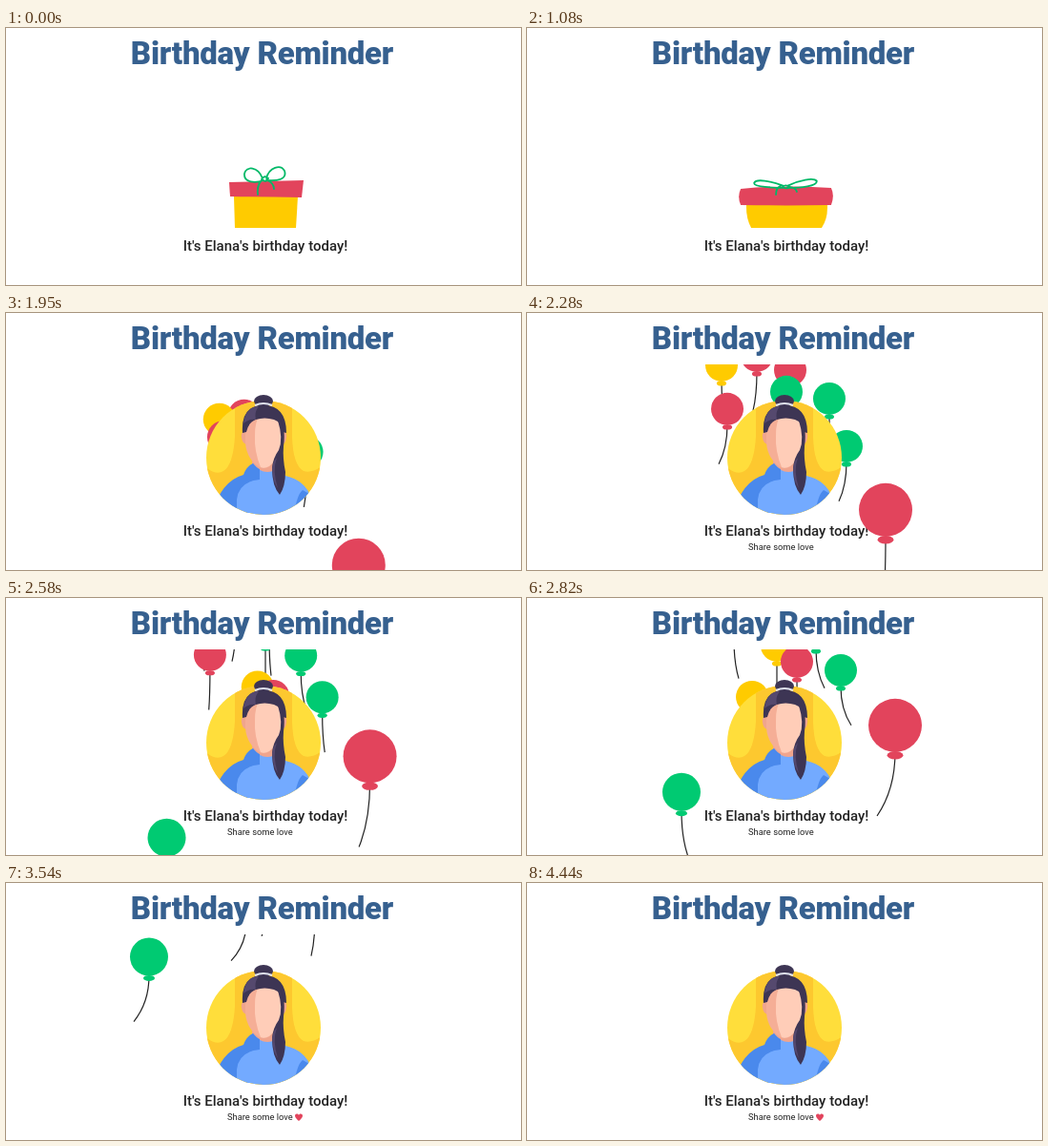
An HTML page for the animation above (4470 ms loop, 540x270 px).

```html
<!DOCTYPE html>
<html lang="en">
<head>
<meta charset="utf-8">
<title>Birthday Reminder</title>
<style>
html, body { margin: 0; height: 100%; overflow: hidden; background: #fff; }
svg { display: block; width: 540px; height: 270px; font-family: Roboto, sans-serif; }
</style>
</head>
<body>
<svg viewBox="0 0 540 270">
  <defs>
    <clipPath id="stage"><rect y="54" width="540" height="216"/></clipPath>
    <clipPath id="disc"><circle cx="270" cy="152" r="60"/></clipPath>
  </defs>
  <text x="268.5" y="38" text-anchor="middle" font-size="33" font-weight="900" letter-spacing="-.25" fill="#36608f">Birthday Reminder</text>
  <g clip-path="url(#stage)">
    <text x="272" y="234" text-anchor="middle" font-size="15" font-weight="500" fill="#222">It's Elana's birthday today!</text>
    <text x="232" y="249" font-size="9.35" fill="#222"><tspan class="word">Share </tspan><tspan class="word">some </tspan><tspan class="word">love</tspan></text>
    <path id="heart" fill="#e2445c" d="M0 4C-2 2.3-4 .7-4-1.4C-4-4-1-4.3 0-2.2C1-4.3 4-4 4-1.4C4 .7 2 2.3 0 4Z"/>
    <g id="gift">
      <path id="box" fill="#ffcb00"/>
      <path id="lid" fill="#e2445c"/>
      <path id="bow" fill="none" stroke="#00b968" stroke-width="1.8" stroke-linecap="round"/>
    </g>
    <circle id="burst" cx="271" fill="#00ca72"/>
    <g id="back"></g>
    <g id="avatar">
      <g clip-path="url(#disc)">
        <path fill="#ffde3b" d="M205 90H335V215H205Z"/>
        <path fill="#fdc82f" d="M205 158Q219 172 228 166Q238 160 240 130V88H300V130Q301 160 312 166Q322 169 335 158V215H205Z"/>
        <path fill="#f0a58d" d="M258 145H284V168Q271 182 258 168Z"/>
        <path fill="#73aaff" d="M217 215Q224 178 250 171L259 158Q270 173 286 163L293 171Q314 176 320 194V215Z"/>
        <path fill="#4a89ec" d="M215 215Q224 177 249 170Q252 161 259 158Q263 163 266 164V175Q244 177 242 196V215Z"/>
        <path fill="#4a89ec" d="M311 186Q304 192 302 215H325V194Z"/>
      </g>
      <path fill="#f0a58d" d="M251 125Q246 124 247 131Q248 138 253 138ZM290 125Q295 124 294 131Q293 138 289 138Z"/>
      <path fill="#f5ae96" d="M251 118Q252 108 270 108Q289 108 290 118V136Q288 152 276 161Q270 165 264 161Q252 152 251 136Z"/>
      <path fill="#ffcdb8" d="M266 108Q289 106 290 118V136Q288 152 276 161Q271 164 267 162Q260 145 261 128Q261 114 266 108Z"/>
      <path fill="#3d3554" d="M248 126Q246 97 270 97Q294 97 294 126L290 125Q290 115 281 112Q271 109 262 112Q254 115 252 125Z"/>
      <path fill="#55496e" d="M266 97Q251 99 249 116Q254 111 262 112Q260 103 266 97Z"/>
      <ellipse cx="270" cy="92.5" rx="10" ry="6.5" fill="#3d3554"/>
      <path stroke="#dfe3ee" stroke-width="2" fill="none" d="M261 97Q270 93 279 97"/>
      <path fill="#3d3554" d="M285 113Q294 118 291 140Q290 153 293 167Q293 182 287 191Q279 182 279 163Q280 152 286 144Q291 132 285 113Z"/>
      <path fill="#55496e" d="M284 152Q279 165 285 184Q280 178 279 163Q280 156 284 152Z"/>
    </g>
    <g id="front"></g>
  </g>
</svg>
<script>
const LOOP = 4470;
const RED = '#e2445c', GREEN = '#00ca72', YELLOW = '#ffcb00';
const el = id => document.getElementById(id);
const words = document.querySelectorAll('.word');
const clamp = v => Math.max(0, Math.min(1, v));

// Linear keyframes: rows of [time, ...values]
function key(rows, t) {
  if (t <= rows[0][0]) return rows[0].slice(1);
  for (let i = 1; i < rows.length; i++) {
    const a = rows[i - 1], b = rows[i];
    if (t < b[0]) {
      const p = (t - a[0]) / (b[0] - a[0]);
      return a.slice(1).map((v, j) => v + (b[j + 1] - v) * p);
    }
  }
  return rows[rows.length - 1].slice(1);
}

// Blends two paths of the same structure
function morph([a, b], k) {
  const to = b.match(/[\d.]+/g);
  let i = 0;
  return a.replace(/[\d.]+/g, n => +n + (to[i++] - n) * k);
}

const BOX = [
  'M239 177Q272 177 306 177Q305 194 304 210Q272 210 240 210Q239.5 194 239 177Z',
  'M230 185Q272 185 315 185Q316 200 309 210Q272 210 235 210Q229 199 230 185Z'];
const LID = [
  'M234 162Q273 161 312 160Q311 169 310 178Q272 177.5 235 177Q234.5 170 234 162Z',
  'M224 169Q273 164.5 319 168Q323 176 319 186Q272 187 224 186Q220 177 224 169Z'];
const BOW = [
  'M270 160C262 163 249 163 250 153C252 145 264 145 269 158M273 158C276 146 288 143 292 150C295 159 285 161 273 160M268 160Q263 165 264 175M274 160Q281 163 281 169M268 159Q271 154 275 158Q273 163 268 159',
  'M270 168C258 168 238 167 238 163C240 158 255 161 269 166M273 166C285 160 301 157 304 161C304 166 288 168 273 168M266 166Q261 168 261 175M275 167Q282 168 283 172M268 167Q271 164 275 167Q273 170 268 167'];
const SQUASH = [[580, 0], [1080, 1], [1230, -.9], [1380, .35], [1500, 0]];
const BURST = [[1440, 0, 161, 1], [1620, 61, 161, 1], [1680, 133, 155, 1], [1740, 150, 155, 1], [1950, 150, 155, 0]];

// colour, radius, then [time, x, y, string sway]
const small = [
  [RED, 17, [2280, 276, 60, 2]],
  [RED, 17, [2280, 241, 45, -4]],
  [YELLOW, 17, [2280, 204, 55, 4]],
  [GREEN, 17, [2280, 272, 83, 0], [2820, 272, -5, 0]],
  [RED, 17, [2280, 210, 101, -9], [2820, 217, 27, 5]],
  [GREEN, 17, [2280, 317, 90, 2], [2820, 303, 37, 9]],
  [GREEN, 17, [2280, 335, 140, -8], [2820, 329, 76, 11], [3540, 324, 19, -4], [3880, 319, -5, -5]],
  [YELLOW, 17, [2820, 262, 50, 0]],
  [RED, 17, [2820, 283, 67, 2], [3540, 276, -2, -8]],
  [YELLOW, 17, [2820, 236, 104, 4], [3540, 252, 24, -16], [3860, 262, -5, -8]],
].map(([color, r, ...rows]) => {
  const [t, x] = rows[0];
  return [color, r, [t - 550, 135 + x / 2, 150, 0], ...rows];
});
const large = [
  [RED, 28, [1750, 366, 300, 10], [2280, 376, 207, -2], [2820, 386, 134, -19], [3300, 392, 46, -8], [3540, 394, -45, 0]],
  [GREEN, 20, [2380, 174, 292, 12], [2820, 162, 204, 7], [3540, 150, 78, -16], [3780, 148, -20, -10]],
];

function balloon([color, size, ...rows], t) {
  const first = rows[0][0], last = rows[rows.length - 1][0];
  if (t < first) return '';
  let [x, y, sway] = key(rows, t);
  y -= Math.max(0, t - last) * .12;
  const r = size * clamp((t - first) / 150);
  return `<g transform="translate(${x} ${y})">
    <path d="M0 ${r}Q0 ${2.4 * r} ${sway} ${3.4 * r}" fill="none" stroke="#222" stroke-width="1.2"/>
    <ellipse cy="${1.12 * r}" rx="${.3 * r}" ry="${.15 * r}" fill="${color}"/>
    <circle r="${r}" fill="${color}"/></g>`;
}

function draw(t) {
  const [k] = key(SQUASH, t);
  el('box').setAttribute('d', morph(BOX, k));
  el('lid').setAttribute('d', morph(LID, k));
  el('bow').setAttribute('d', morph(BOW, k));
  el('gift').setAttribute('visibility', t < 1620 ? 'visible' : 'hidden');

  const [r, cy, alpha] = key(BURST, t);
  const burst = el('burst');
  burst.setAttribute('r', r);
  burst.setAttribute('cy', cy);
  burst.setAttribute('opacity', alpha);

  const grow = clamp((t - 1625) / 50);
  el('avatar').setAttribute('transform', `translate(270 152) scale(${grow}) translate(-270 -152)`);

  words.forEach((w, i) => w.setAttribute('fill-opacity', clamp((t - 2050 - i * 50) / 120)));
  const [beat] = key([[3180, 0], [3300, 1.25], [3400, 1]], t);
  el('heart').setAttribute('transform', `translate(307 246) scale(${beat})`);

  el('back').innerHTML = small.map(b => balloon(b, t)).join('');
  el('front').innerHTML = large.map(b => balloon(b, t)).join('');
}

const start = performance.now();
function tick() {
  draw((performance.now() - start) % LOOP);
  requestAnimationFrame(tick);
}
tick();
</script>
</body>
</html>
```
